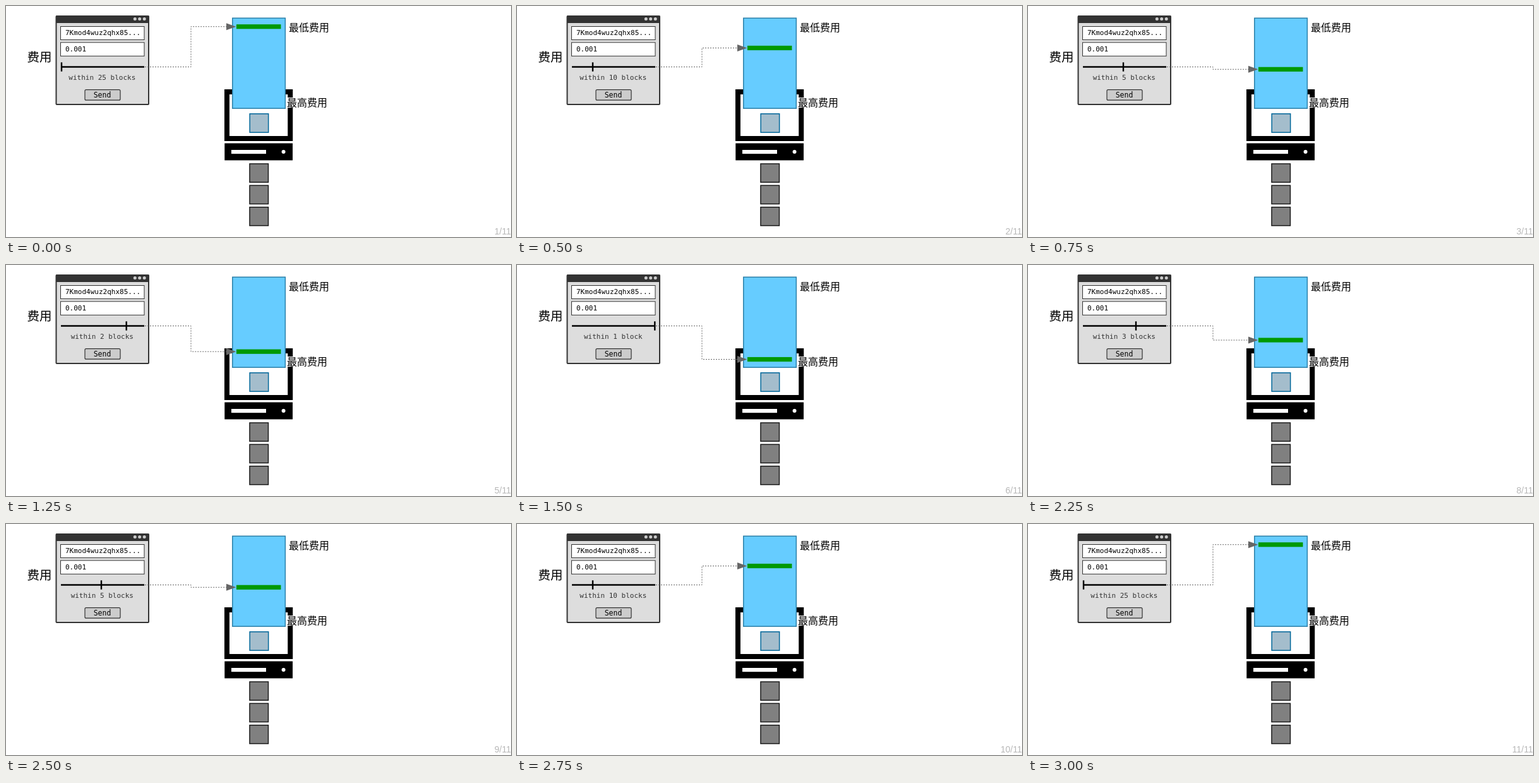
Recreate the animation shown at these times as an HTML page. Size 800 by 366 pixels, loop 3500 ms.

```html
<!DOCTYPE html>
<html lang="zh-CN">
<head>
<meta charset="utf-8">
<title>Fee slider</title>
<style>
html, body { margin: 0; width: 100%; height: 100%; overflow: hidden; background: #fff; }
svg { display: block; }
.mono { font: 11px "DejaVu Sans Mono", monospace; white-space: pre; }
.cjk { font: 16px "Noto Sans CJK SC", "Noto Sans CJK", sans-serif; }
.block { fill: #808080; stroke: #1a1a1a; stroke-width: 1.5; }
.field { fill: #fff; stroke: #333; }
</style>
</head>
<body>
<svg width="800" height="366" viewBox="0 0 800 366">
  <!-- wallet window -->
  <rect x="79.5" y="16" width="146.5" height="140" rx="1" fill="#ddd" stroke="#333" stroke-width="2"/>
  <rect x="79" y="15.5" width="147.5" height="11.5" fill="#333"/>
  <g fill="#ccc">
    <circle cx="204.3" cy="20.5" r="2.5"/>
    <circle cx="211.7" cy="20.5" r="2.5"/>
    <circle cx="219.2" cy="20.5" r="2.5"/>
  </g>
  <rect class="field" x="86.5" y="32.5" width="132.5" height="21"/>
  <rect class="field" x="86.5" y="57.8" width="132.5" height="21.5"/>
  <rect x="125" y="132.7" width="56" height="16.5" rx="2" fill="#ccc" stroke="#333" stroke-width="1.2"/>
  <g class="mono">
    <text x="94" y="46">7Kmod4wuz2qhx85...</text>
    <text x="94" y="72">0.001</text>
    <text x="152.5" y="145" text-anchor="middle" style="font-size:11.5px">Send</text>
    <text id="label" x="152.3" y="117" text-anchor="middle" fill="#333"></text>
  </g>
  <path d="M87 96.5H219" stroke="#000" stroke-width="2.4"/>
  <path id="knob" stroke="#000" stroke-width="2.4"/>

  <!-- node -->
  <rect x="350" y="136" width="100.3" height="74" fill="#fff" stroke="#000" stroke-width="8"/>
  <rect x="346.3" y="217.5" width="107.8" height="27"/>
  <rect x="357" y="228" width="55" height="6.2" fill="#fff"/>
  <circle cx="439.6" cy="231" r="3" fill="#fff"/>
  <rect x="444.5" y="145" width="66" height="16" fill="#fff"/>
  <rect x="358.8" y="19.2" width="83.6" height="143" fill="#6cf" stroke="#2a7fa8" stroke-width="1.5"/>
  <rect x="386.2" y="170.8" width="29.5" height="29.5" fill="#a4bdcc" stroke="#069" stroke-width="1.5"/>
  <rect class="block" x="386" y="250" width="29.5" height="29.3"/>
  <rect class="block" x="386" y="284.3" width="29.5" height="29.3"/>
  <rect class="block" x="386" y="318.7" width="29.5" height="29.3"/>

  <!-- place in the queue -->
  <path id="wire" fill="none" stroke="#666" stroke-dasharray="2 2"/>
  <g id="mark">
    <rect x="365" y="-3.6" width="70.5" height="7.2" fill="#090"/>
    <path d="M349 -5.5L364.5 0L349 5.5Z" fill="#666"/>
  </g>

  <g class="cjk">
    <text x="33.5" y="88" style="font-size:19.5px">费用</text>
    <text x="448" y="40">最低费用</text>
    <text x="445" y="159">最高费用</text>
  </g>
  <text id="page" x="800" y="362" text-anchor="end" fill="#b8b8b8"
    style="font:14px 'Liberation Sans', Arial, sans-serif"></text>
</svg>
<script>
const el = id => document.getElementById(id);
// blocks to wait, knob x, mark y
const steps = [
  [25, 88, 32.7], [10, 120, 66.5], [5, 151, 100.3],
  [3, 171, 119], [2, 190.7, 137.2], [1, 218.3, 149.5]
];
let shown = -1;

function show(i) {
  const [blocks, x, y] = steps[5 - Math.abs(5 - i)];
  el("label").textContent = `within ${blocks} block${blocks > 1 ? "s" : ""}`;
  el("knob").setAttribute("d", `M${x} 89.3V103.7`);
  el("wire").setAttribute("d", `M220 96.5H293V${y}H350`);
  el("mark").setAttribute("transform", `translate(0 ${y})`);
  el("page").textContent = `${i + 1}/11`;
}

function tick() {
  // quarter-second slots; first, middle and last steps last two slots
  const slot = Math.floor(performance.now() % 3500 / 250);
  const i = slot - (slot > 0) - (slot > 6) - (slot > 12);
  if (i !== shown) show(shown = i);
  requestAnimationFrame(tick);
}
tick();
</script>
</body>
</html>
```
